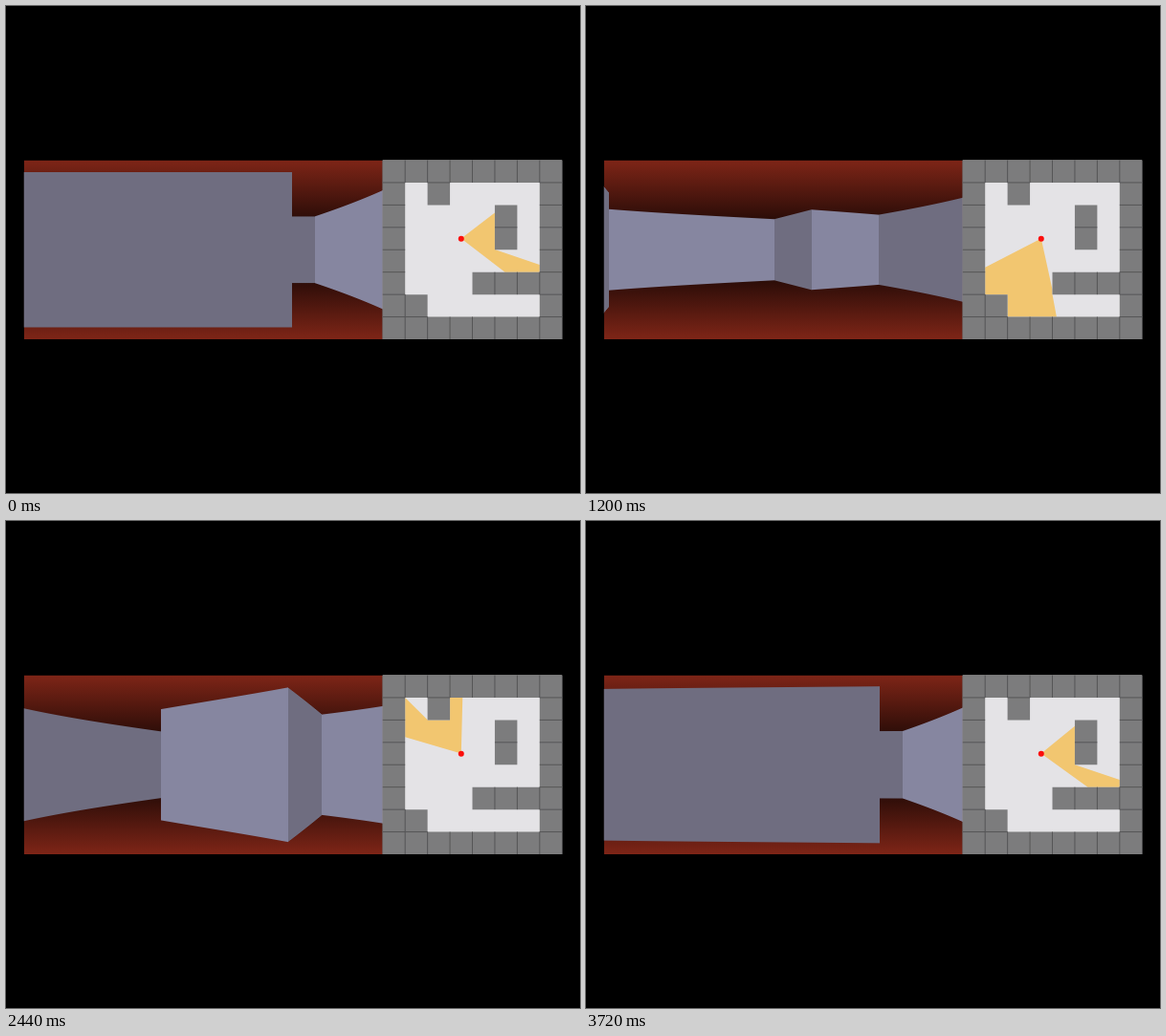
Recreate the animation shown at these times as an HTML page with a canvas. Size 600x510 px, loop 3.76 s.

```html
<!DOCTYPE html>
<html lang="en">
<head>
<meta charset="utf-8">
<title>Raycaster</title>
<style>
  html, body { margin: 0; width: 100%; height: 100%; overflow: hidden; background: #000; }
  canvas { display: block; width: 600px; height: 510px; }
</style>
</head>
<body>
<canvas id="stage" width="600" height="510"></canvas>
<script>
const ctx = document.getElementById('stage').getContext('2d');

const MAP = [
  '########',
  '#.#....#',
  '#....#.#',
  '#....#.#',
  '#......#',
  '#...####',
  '##.....#',
  '########'
];
const LOOP = 3760, STEP = 40;
const VIEW = { x: 18.75, y: 161.5, w: 375, h: 187.5 };
const MAP_X = VIEW.x + VIEW.w, MAP_Y = VIEW.y, CELL = VIEW.h / 8;
const MID_X = VIEW.x + VIEW.w / 2 + 0.35, MID_Y = VIEW.y + VIEW.h / 2;
const FOV = 75, PX_PER_DEG = VIEW.w / FOV, WALL = 243.75;
const EYE = { x: 3.5, y: 3.5 };

// [step, heading in degrees]
const TURN = [[0, 0], [10, 42], [22, 90], [37, 143.9], [50, 197.9], [70, 270], [92, 358.3]];

const rad = deg => deg * Math.PI / 180;
const solid = (x, y) => MAP[y]?.[x] === '#';
const mapX = x => MAP_X + x * CELL;
const mapY = y => MAP_Y + y * CELL;

function heading(step) {
  let i = 1;
  while (i < TURN.length - 1 && step > TURN[i][0]) i++;
  const [s0, a0] = TURN[i - 1], [s1, a1] = TURN[i];
  return a0 + (a1 - a0) * (step - s0) / (s1 - s0);
}

// Walk the grid until the ray meets a wall.
function cast(deg) {
  const dx = Math.cos(rad(deg)), dy = Math.sin(rad(deg));
  const stepX = Math.sign(dx), stepY = Math.sign(dy);
  const deltaX = Math.abs(1 / dx), deltaY = Math.abs(1 / dy);
  let x = Math.floor(EYE.x), y = Math.floor(EYE.y);
  let nextX = deltaX / 2, nextY = deltaY / 2;
  let dist = 0, side = false;
  while (!solid(x, y)) {
    side = nextX < nextY;
    if (side) { dist = nextX; nextX += deltaX; x += stepX; }
    else { dist = nextY; nextY += deltaY; y += stepY; }
  }
  return { dist, side, x: EYE.x + dx * dist, y: EYE.y + dy * dist };
}

const shade = ctx.createLinearGradient(0, VIEW.y, 0, VIEW.y + VIEW.h);
shade.addColorStop(0, 'rgb(126,37,23)');
shade.addColorStop(0.5, 'rgb(0,0,0)');
shade.addColorStop(1, 'rgb(126,37,23)');

function drawView(angle) {
  ctx.save();
  ctx.beginPath();
  ctx.rect(VIEW.x, VIEW.y, VIEW.w, VIEW.h);
  ctx.clip();
  ctx.fillStyle = shade;
  ctx.fillRect(VIEW.x, VIEW.y, VIEW.w, VIEW.h);
  for (let x = Math.floor(VIEW.x); x < MAP_X; x++) {
    const off = (x + 0.5 - MID_X) / PX_PER_DEG;
    const hit = cast(angle + off);
    const h = WALL / (hit.dist * Math.cos(rad(off)));
    ctx.fillStyle = hit.side ? '#6f6d80' : '#8686a0';
    ctx.fillRect(x, MID_Y - h / 2, 1, h);
  }
  ctx.restore();
}

function drawMap(angle) {
  ctx.fillStyle = '#e4e3e6';
  ctx.fillRect(MAP_X, MAP_Y, VIEW.h, VIEW.h);

  ctx.fillStyle = '#f2c670';
  ctx.beginPath();
  ctx.moveTo(mapX(EYE.x), mapY(EYE.y));
  for (let off = -FOV / 2; off <= FOV / 2; off += 0.25) {
    const hit = cast(angle + off);
    ctx.lineTo(mapX(hit.x), mapY(hit.y));
  }
  ctx.fill();

  ctx.fillStyle = '#7c7c7d';
  ctx.beginPath();
  MAP.forEach((row, y) => [...row].forEach((c, x) => {
    if (c === '#') ctx.rect(mapX(x), mapY(y), CELL, CELL);
  }));
  ctx.fill();

  ctx.strokeStyle = '#555556';
  ctx.lineWidth = 1;
  ctx.beginPath();
  MAP.forEach((row, y) => [...row].forEach((c, x) => {
    if (c !== '#') return;
    if (solid(x - 1, y)) {
      ctx.moveTo(mapX(x), mapY(y));
      ctx.lineTo(mapX(x), mapY(y + 1));
    }
    if (solid(x, y - 1)) {
      ctx.moveTo(mapX(x), mapY(y));
      ctx.lineTo(mapX(x + 1), mapY(y));
    }
  }));
  ctx.stroke();

  ctx.fillStyle = '#fb0d0b';
  ctx.beginPath();
  ctx.arc(mapX(EYE.x), mapY(EYE.y) + 0.3, 3, 0, Math.PI * 2);
  ctx.fill();
}

function draw(time) {
  // The first pose is held for two steps.
  const step = Math.max(0, Math.floor((time % LOOP) / STEP) - 1);
  const angle = heading(step);
  ctx.fillStyle = '#000';
  ctx.fillRect(0, 0, 600, 510);
  drawView(angle);
  drawMap(angle);
}

let start = null;
function tick(now) {
  start ??= now;
  draw(Math.max(0, now - start));
  requestAnimationFrame(tick);
}
draw(0);
requestAnimationFrame(tick);
</script>
</body>
</html>
```
